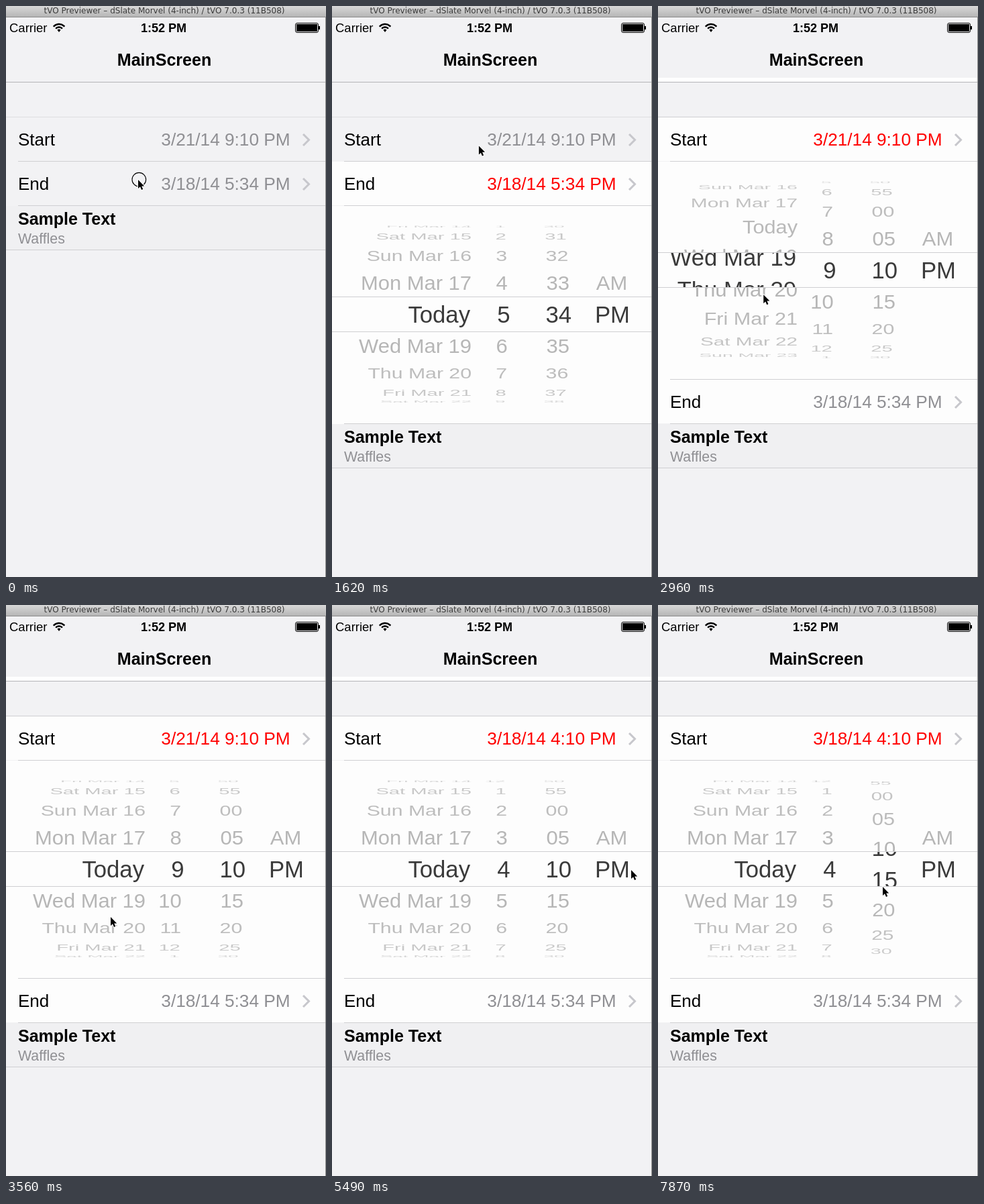
An HTML page with a canvas for the animation above (8000 ms loop, 477x851 px).

```html
<!DOCTYPE html>
<html lang="en">
<head>
<meta charset="utf-8">
<title>Date picker</title>
<style>
html, body { margin: 0; width: 477px; height: 851px; overflow: hidden; background: #f2f2f4; }
canvas { display: block; }
</style>
</head>
<body>
<canvas id="stage" width="477" height="851"></canvas>
<script>
const ctx = document.getElementById("stage").getContext("2d");
const W = 476, H = 851, LOOP = 8000, TICK = LOOP / 54;
const SANS = '"Liberation Sans", Arial, sans-serif';
const BG = "#f2f2f4", CELL = "#fdfdfd", PRESSED = "#dfdfdf";
const GREY = "#8f8f93", LINE = "#cfcfd2";
const ROW = 66, PICKER = 325;
const RADIUS = 131, STEP = 0.365;
const DAYS = ["Sun", "Mon", "Tue", "Wed", "Thu", "Fri", "Sat"];

// The screen refreshes in steps, a little ahead of each tick.
const snap = t => Math.floor((t + 16) / TICK) * TICK;

// Smooth step from 0 to 1.
function ease(t, start, length) {
  const x = Math.min(1, Math.max(0, (t - start) / length));
  return x * x * (3 - 2 * x);
}

// Pointer moves: start, length, destination.
const MOVES = [
  [150, 300, 198, 268],
  [1200, 500, 219, 204],
  [2400, 260, 160, 325],
  [2660, 450, 155, 464],
  [3600, 250, 252, 360],
  [3850, 1000, 254, 530],
  [5000, 440, 445, 394],
  [5790, 280, 345, 560],
  [6080, 600, 345, 400],
  [6830, 280, 345, 467],
  [7110, 740, 334, 419]
];

function pointer(t) {
  let x = 196, y = 258;
  for (const [start, length, toX, toY] of MOVES) {
    const k = ease(t, start, length);
    x += (toX - x) * k;
    y += (toY - y) * k;
  }
  return [x, y];
}

function box(x, y, w, h, fill) {
  ctx.fillStyle = fill;
  ctx.fillRect(x, y, w, h);
}

function rule(y, x = 0, color = LINE) {
  box(x, Math.round(y), W - x, 1, color);
}

function text(str, x, y, size, color, { align = "left", weight = "400", font = SANS } = {}) {
  ctx.font = `${weight} ${size}px ${font}`;
  ctx.textAlign = align;
  ctx.fillStyle = color;
  ctx.fillText(str, x, y);
}

const dayName = n => n === 0 ? "Today" : `${DAYS[(n + 72) % 7]} Mar ${18 + n}`;
const hourName = n => String((n + 119) % 12 + 1);
const minuteName = step => n => String((n * step + 600) % 60).padStart(2, "0");
const halfName = n => ["AM", "PM"][n] || "";

// Right edge of the middle row, of the side rows, and the inward drift.
const COLUMNS = [
  { middle: 206, side: 208, drift: 0 },
  { middle: 265.5, side: 262, drift: 4 },
  { middle: 357, side: 354.5, drift: 9 },
  { middle: 444, side: 441, drift: 12 }
];

function wheel({ middle, side, drift }, value, name, mid, dark) {
  for (let n = Math.floor(value) - 4; n <= value + 5; n++) {
    const angle = (n - value) * STEP;
    if (Math.abs(angle) > 1.55) continue;
    const c = Math.cos(angle), away = 1 - c;
    const size = dark ? 34.7 : 31.2 * (1 - 0.12 * away);
    ctx.save();
    ctx.translate(dark ? middle : side - drift * away, mid + RADIUS * Math.sin(angle));
    ctx.scale(1, c);
    ctx.globalAlpha = 1 - (dark ? 0 : 0.5 * away);
    text(name(n), 0, size * 0.36, size, dark ? "#3a3a3a" : "#b4b4b4", { align: "right" });
    ctx.restore();
  }
}

function picker(top, values, minuteStep) {
  const mid = top + 161.5;
  const names = [dayName, hourName, minuteName(minuteStep), halfName];
  box(0, top, W, PICKER, CELL);
  for (const dark of [false, true]) {
    ctx.save();
    ctx.beginPath();
    if (dark) {
      ctx.rect(0, mid - 26, W, 52);
    } else {
      ctx.rect(0, mid - 132, W, 106);
      ctx.rect(0, mid + 26, W, 106);
    }
    ctx.clip();
    values.forEach((v, i) => wheel(COLUMNS[i], v, names[i], mid, dark));
    ctx.restore();
  }
  rule(mid - 26.5);
  rule(mid + 25.5);
  rule(top + PICKER - 1, 18);
}

function dateRow(top, label, value, red, fill) {
  box(0, top, W, ROW - 1, fill);
  text(label, 18, top + 42, 26, "#000");
  text(value, 423.5, top + 42, 26.2, red ? "#f00" : GREY, { align: "right" });
  ctx.strokeStyle = "#c7c7cc";
  ctx.lineWidth = 3;
  ctx.beginPath();
  ctx.moveTo(443, top + 25);
  ctx.lineTo(451.5, top + 33.5);
  ctx.lineTo(443, top + 42);
  ctx.stroke();
  rule(top + ROW - 1, 18);
}

function sampleRow(top) {
  box(0, top, W, ROW - 1, "#f0f0f2");
  text("Sample Text", 18, top + 28, 25, "#000", { weight: "700" });
  text("Waffles", 18, top + 56, 21.3, GREY);
  rule(top + ROW - 1);
}

function titleBar() {
  const shade = ctx.createLinearGradient(0, 0, 0, 16);
  shade.addColorStop(0, "#d8d8d8");
  shade.addColorStop(1, "#b6b6b6");
  box(0, 0, 477, 16, shade);
  box(0, 16, 477, 1, "#8c8c8c");
  text("tVO Previewer – dSlate Morvel (4-inch) / tVO 7.0.3 (11B508)", 236, 11, 12, "#3a3a3a",
    { align: "center", font: '"DejaVu Sans", sans-serif' });
}

function statusBar() {
  text("Carrier", 5, 39, 18.5, "#000");
  text("1:52 PM", 235, 39, 18, "#000", { align: "center", weight: "700" });
  ctx.strokeStyle = ctx.fillStyle = "#000";
  const from = -Math.PI * 0.77, to = -Math.PI * 0.23;
  ctx.lineWidth = 2.4;
  for (const r of [6.5, 11]) {
    ctx.beginPath();
    ctx.arc(79, 38, r, from, to);
    ctx.stroke();
  }
  ctx.beginPath();
  ctx.moveTo(79, 39);
  ctx.arc(79, 38, 3.4, from, to);
  ctx.fill();

  ctx.lineWidth = 1;
  ctx.beginPath();
  ctx.roundRect(431.5, 25.5, 34, 14, 2.5);
  ctx.stroke();
  box(433, 27, 31, 11, "#000");
  box(466, 30, 2, 5, "#000");
}

function cursor(x, y, ring) {
  ctx.save();
  ctx.translate(x, y);
  if (ring) {
    ctx.strokeStyle = "#000";
    ctx.lineWidth = 1.1;
    ctx.beginPath();
    ctx.arc(2.3, 0.7, 10.3, 0, Math.PI * 2);
    ctx.stroke();
  }
  const arrow = new Path2D("M1 1V14L4 11.2L6 16L8.2 15L6.2 10.4H10.2Z");
  ctx.lineWidth = 2;
  ctx.lineJoin = "round";
  ctx.strokeStyle = "#fff";
  ctx.stroke(arrow);
  ctx.fillStyle = "#000";
  ctx.fill(arrow);
  ctx.restore();
}

function draw(time) {
  const t = snap(time);
  const endOpen = ease(t, 160, 280) - ease(t, 1785, 280);
  const startOpen = ease(t, 2092, 280);
  const endTop = 232 + Math.round(PICKER * startOpen);
  const sampleTop = endTop + ROW + Math.round(PICKER * endOpen);

  const day = 3 - 3 * ease(t, 2650, 600);
  const hour = 9 - 5 * ease(t, 3850, 1200);
  const minute = 2 + 4.2 * ease(t, 6080, 600) - 3.53 * ease(t, 6830, 1022);
  const startDate = `3/${t < 3650 ? 21 : 18}/14 ${t < 5000 ? 9 : 4}:10 PM`;

  box(0, 0, 477, H, BG);
  if (t > 2200) box(0, 107, W, 6, "#fff");
  rule(113, 0, "#b4b4b7");
  text("MainScreen", 236, 89, 25, "#000", { align: "center", weight: "700" });
  rule(165, 0, t < 2300 ? "#dedee0" : LINE);

  const startFill = t < 1750 ? BG : t < 2450 ? PRESSED : CELL;
  dateRow(166, "Start", startDate, t > 1900, startFill);
  if (startOpen > 0) {
    picker(232, [day, hour, minute, 1], 5);
    if (startOpen < 1) rule(endTop - 1, 0, "#c4c4c6");
  }

  if (endOpen > 0) picker(endTop + ROW, [0, 5, 34, 1], 1);
  const endFill = t < 140 ? BG : t < 500 ? PRESSED : CELL;
  dateRow(endTop, "End", "3/18/14 5:34 PM", t > 290 && t < 1900, endFill);
  sampleRow(sampleTop);
  rule(sampleTop - 1, 18);

  titleBar();
  statusBar();
  box(476, 17, 1, H - 17, "#8a8a8a");
  cursor(...pointer(t), t < 1300);
}

function tick(now) {
  draw(now % LOOP);
  requestAnimationFrame(tick);
}
draw(0);
requestAnimationFrame(tick);
</script>
</body>
</html>
```
